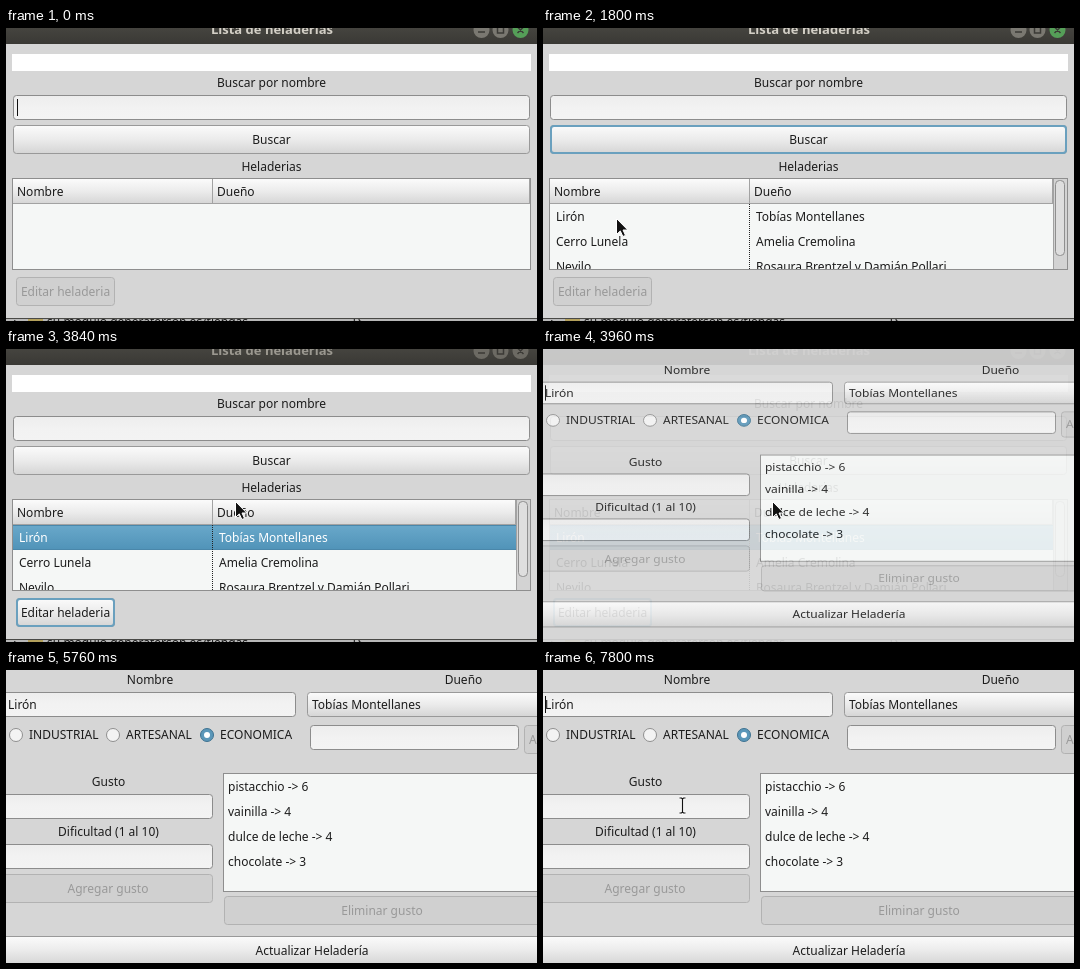
Recreate the animation shown at these times as an HTML page. Size 531 by 293 pixels, loop 8 s.

```html
<!DOCTYPE html>
<html lang="es">
<head>
<meta charset="utf-8">
<title>Lista de heladerias</title>
<style>
html, body { margin: 0; width: 100%; height: 100%; overflow: hidden; background: #d6d6d6; }
svg { display: block; width: 531px; height: 293px; }
text { font: 12px "Noto Sans", "Open Sans", sans-serif; fill: #1c1c1c; white-space: pre; }
.mid { text-anchor: middle; }
.off { fill: #999; }
.title { font-size: 13px; font-weight: 700; }
</style>
</head>
<body>
<svg id="stage" viewBox="0 0 531 293" xmlns="http://www.w3.org/2000/svg"></svg>
<script>
const LOOP = 8000, STEP = 120, ENTRY_H = 25, BUTTON_H = 29;
const stage = document.getElementById('stage');

const rect = (x, y, w, h, fill, extra = '') =>
  `<rect x="${x}" y="${y}" width="${w}" height="${h}" fill="${fill}" ${extra}/>`;
const text = (x, y, s, cls = '', extra = '') =>
  `<text x="${x}" y="${y}" class="${cls}" ${extra}>${s.replace(/>/g, '&gt;')}</text>`;
const mid = (x, y, s, cls = '') => text(x, y, s, 'mid ' + cls);
const grad = (id, ...stops) =>
  `<linearGradient id="${id}" x2="0" y2="1">${stops.map((c, i) =>
    `<stop offset="${i / (stops.length - 1)}" stop-color="${c}"/>`).join('')}</linearGradient>`;
const box = (x, y, w, h, fill, line, r = 3) =>
  rect(x + .5, y + .5, w - 1, h - 1, fill, `rx="${r}" stroke="${line}"`);
const entry = (x, y, w) => box(x, y, w, ENTRY_H, 'url(#entry)', '#8c8c8c');

// mode: '', 'hover', 'press' or 'off'
function button(x, y, w, label, mode = '', focus = false, cx = x + w / 2) {
  const fill = mode === 'off' ? '#d0d0d0' : `url(#${mode || 'plain'})`;
  const ring = focus
    ? rect(x + 1, y + 1, w - 2, BUTTON_H - 2, 'none', 'rx="3" stroke="#6aa0be" stroke-width="2"') : '';
  return box(x, y, w, BUTTON_H, fill, mode === 'off' ? '#b2b2b2' : '#999') + ring +
    mid(cx, y + 19, label, mode === 'off' ? 'off' : '');
}

const shops = [
  ['Lirón', 'Tobías Montellanes'],
  ['Cerro Lunela', 'Amelia Cremolina'],
  ['Nevilo', 'Rosaura Brentzel y Damián Pollari']
];

const defs = `<defs>
  ${grad('plain', '#fbfbfb', '#ebebeb', '#d5d5d5')}
  ${grad('hover', '#ffffff', '#f5f5f5', '#e4e4e4')}
  ${grad('press', '#c6c6c6', '#d2d2d2')}
  ${grad('entry', '#ededed', '#f2f2f2', '#f3f3f3')}
  ${grad('row', '#69a8ca', '#5093b8')}
  ${grad('bar', '#45443f', '#3a3935')}
  <clipPath id="body">${rect(7, 176, 517, 65, '#000')}</clipPath>
  <clipPath id="below">${rect(0, 291, 531, 2, '#000')}</clipPath>
</defs>`;

function titleBar(dim) {
  const dark = '#3b3a36', knob = dim ? '#6c6a63' : '#7a7871';
  const disc = (x, c) => `<circle cx="${x}" cy="2" r="8" fill="${c}"/>`;
  const pen = `fill="none" stroke="${dark}" stroke-width="1.5"`;
  return rect(0, 0, 531, 16, 'url(#bar)') +
    text(266, 6, 'Lista de heladerias', 'title mid', `style="fill:${dim ? '#9b9890' : '#d3cfc6'}"`) +
    disc(475.5, knob) + disc(494.5, knob) + disc(514.5, dim ? knob : '#559f58') +
    `<path d="M472 4H479M491.5 -1H497.5V5H491.5ZM511.5 -1L517.5 5M517.5 -1L511.5 5" ${pen}/>`;
}

function table(full, picked) {
  const right = full ? 510 : 524;
  let s = rect(6.5, 150.5, 518, 91, '#f5f7f6', 'stroke="#8e8e8e"') +
    rect(7, 151, right - 7, 25, 'url(#plain)') +
    `<path d="M7 175.5H${right}M206.5 151V176M${right - .5} 151V176" stroke="#a2a2a2"/>` +
    text(11, 168, 'Nombre') + text(211, 168, 'Dueño');
  if (!full) return s;
  if (picked) s += rect(7, 176, 503, 25, 'url(#row)') +
    '<path d="M7 176.5H510M7 200.5H510" stroke="#4a87aa"/>';
  s += '<g clip-path="url(#body)">' + shops.map((shop, i) => shop.map((name, j) =>
    text(13 + 200 * j, 193 + 25 * i, name, '', picked && !i ? 'style="fill:#fff"' : '')).join('')).join('') +
    '<path d="M206.5 176V241" stroke="#222" stroke-dasharray="1 1"/></g>';
  return s + rect(510, 151, 14, 90, '#d3d3d3') +
    '<path d="M510.5 151V241" stroke="#a2a2a2"/>' + box(512, 152, 10, 76, '#dedede', '#8f8f8f', 4);
}

function behind() {
  return rect(0, 290, 531, 3, '#b8b8b8') + rect(0, 290, 531, 1, '#4a4a47') +
    '<g clip-path="url(#below)">' + rect(22, 290, 15, 3, '#b3a05c') +
    text(8, 298, '▸') + text(41, 298, 'su.modulo generaterson.es/tiendas') +
    text(345, 298, 'TS') + '</g>';
}

function listWindow(t, p) {
  const full = t >= 1080, picked = t >= 2040;
  const over = (x, y, w) => p && p.x >= x && p.x < x + w && p.y >= y && p.y < y + BUTTON_H;
  const search = t === 960 ? 'press' : over(7, 97, 517) ? 'hover' : '';
  const edit = !picked ? 'off' : t >= 3000 && t < 3120 ? 'press' : over(10, 249, 99) ? 'hover' : '';
  const caret = t < 240 || (t >= 600 && t < 960);
  return rect(0, 0, 531, 293, '#d6d6d6') + titleBar(t >= 3840) +
    rect(6, 26, 519, 17, '#fff') + mid(265.5, 59, 'Buscar por nombre') +
    entry(7, 67, 517) + (caret ? rect(11, 71, 1, 17, '#111') : '') +
    button(7, 97, 517, 'Buscar', search, t >= 960 && !picked) +
    mid(265.5, 143, 'Heladerias') + table(full, picked) +
    button(10, 249, 99, 'Editar heladeria', edit, t >= 3000) + behind();
}

function radio(x, label, on) {
  return `<circle cx="${x}" cy="65" r="6.5" fill="${on ? '#5b97b9' : '#f3f3f3'}" stroke="${on ? '#3f7391' : '#8f8f8f'}"/>` +
    (on ? `<circle cx="${x}" cy="65" r="3" fill="#fff"/>` : '') + text(x + 13, 69, label);
}

const blinks = [4560, 5040, 5760, 6240, 6960, 7320];

function editWindow(t) {
  const caret = blinks.filter(b => t >= b).length % 2 === 0;
  const flavours = ['pistacchio -> 6', 'vainilla -> 4', 'dulce de leche -> 4', 'chocolate -> 3'];
  return rect(0, -60, 531, 420, '#d6d6d6') +
    mid(144, 14, 'Nombre') + mid(457.5, 14, 'Dueño') +
    entry(-10, 22, 300) + text(2, 39, shops[0][0]) + (caret ? rect(2, 26, 1, 17, '#111') : '') +
    box(301, 22, 250, ENTRY_H, 'url(#plain)', '#999') + text(306, 39, shops[0][1]) +
    radio(10, 'INDUSTRIAL') + radio(107, 'ARTESANAL') + radio(201, 'ECONOMICA', true) +
    entry(304, 55, 209) + box(518, 55, 40, BUTTON_H, '#d0d0d0', '#b2b2b2') + text(523, 74, 'A', 'off') +
    mid(102.5, 116, 'Gusto') + entry(-10, 124, 217) +
    mid(102.5, 166, 'Dificultad (1 al 10)') + entry(-10, 174, 217) +
    button(-10, 204, 217, 'Agregar gusto', 'off', false, 102) +
    rect(217.5, 103.5, 330, 118, '#f5f7f6', 'stroke="#8e8e8e"') +
    flavours.map((f, i) => text(222, 121 + 25 * i, f)).join('') +
    button(218, 226, 330, 'Eliminar gusto', 'off', false, 376) +
    button(-10, 266, 560, 'Actualizar Heladería', '', false, 306);
}

// pointer tip over time: [ms, x, y]
const visits = [
  [[120, 170, 171], [360, 165, 104], [480, 160, 68], [720, 150, 106], [1200, 150, 106],
   [1800, 73, 190], [2160, 73, 190], [2760, 73, 258], [3120, 73, 258], [3840, 229, 152],
   [3960, 229, 152], [4680, 372, 1]],
  [[5880, 367, 0], [6360, 267, 133], [6600, 267, 133], [7320, 248, 135], [7440, 248, 135],
   [7800, 139, 135], [8000, 139, 135]]
];

function pointerAt(t) {
  const keys = visits.find(k => t >= k[0][0] && t <= k[k.length - 1][0]);
  if (!keys) return null;
  const i = Math.max(1, keys.findIndex(k => k[0] >= t));
  const [a, b] = [keys[i - 1], keys[i]];
  const u = (t - a[0]) / (b[0] - a[0]), e = u * u * (3 - 2 * u);
  return { x: Math.round(a[1] + (b[1] - a[1]) * e), y: Math.round(a[2] + (b[2] - a[2]) * e) };
}

function pointer(p, editing) {
  if (!p) return '';
  const fields = editing ? [[-10, 22, 290], [304, 55, 513], [-10, 124, 207], [-10, 174, 207]] : [[7, 67, 524]];
  const typing = fields.some(([l, y, r]) => p.x >= l && p.x < r && p.y >= y && p.y < y + ENTRY_H);
  const bar = 'M-3 -7.5H-1L0 -6.5L1 -7.5H3M0 -6.5V6.5M-3 7.5H-1L0 6.5L1 7.5H3';
  return `<g transform="translate(${p.x + .5} ${p.y + .5})">` + (typing
    ? `<path d="${bar}" fill="none" stroke="#fff" stroke-width="3"/><path d="${bar}" fill="none" stroke="#111" stroke-width="1.2"/>`
    : '<path d="M0 0V16L3.8 12.4L6.4 18L9 16.9L6.5 11.5H11.3Z" fill="#111" stroke="#fff"/>') + '</g>';
}

function render(ms) {
  const t = Math.floor(ms / STEP + 1e-4) * STEP;
  const p = pointerAt(t), editing = t >= 3960, opening = t === 3960;
  let s = defs;
  if (!editing || opening) s += listWindow(t, p);
  if (opening) s += `<g opacity=".9" transform="translate(0 12.9) scale(1 .9)">${editWindow(t)}</g>`;
  else if (editing) s += editWindow(t);
  stage.innerHTML = s + pointer(p, editing);
}

let start = null, last = -1;
function tick() {
  const now = performance.now();
  if (start === null) start = now;
  const ms = (now - start) % LOOP, slot = Math.floor(ms / STEP + 1e-4);
  if (slot !== last) { render(ms); last = slot; }
  requestAnimationFrame(tick);
}
tick();
</script>
</body>
</html>
```
